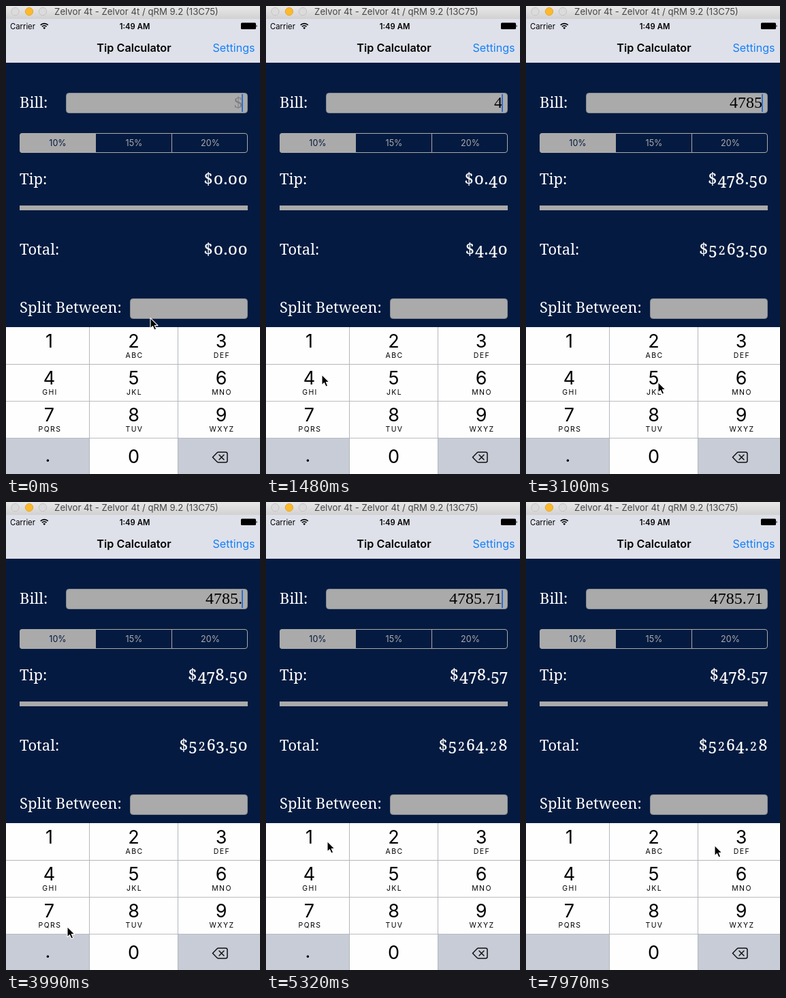
Animation of 373 by 685 pixels, one loop 8 s. Source, as an HTML page:

```html
<!DOCTYPE html>
<html lang="en">
<head>
<meta charset="utf-8">
<title>Tip Calculator</title>
<style>
  html, body { margin: 0; width: 100%; height: 100%; overflow: hidden; background: #041a40; }
  svg { display: block; width: 373px; height: 685px; font-family: Inter, Roboto, sans-serif; }
  text { white-space: pre; }
  .mid { text-anchor: middle; }
  .label { font: 22px "Noto Serif", Georgia, serif; fill: #fff; }
  .bill { font: 24px "Liberation Serif", Times, serif; text-anchor: end; }
  .money { text-anchor: middle; stroke: #fff; stroke-width: .2; }
  .digit { font-size: 27px; text-anchor: middle; }
  .letters { font-size: 10.5px; letter-spacing: 1.4px; text-anchor: middle; }
</style>
</head>
<body>
<svg viewBox="0 0 373 685">
  <defs>
    <linearGradient id="chrome" x2="0" y2="1">
      <stop stop-color="#e9e8e9"/><stop offset="1" stop-color="#d2d1d2"/>
    </linearGradient>
  </defs>

  <!-- window title -->
  <rect width="373" height="19" fill="url(#chrome)"/>
  <g stroke-width=".8">
    <circle cx="13.5" cy="8" r="5.7" fill="#dcdbdc" stroke="#bebdbe"/>
    <circle cx="34" cy="8" r="5.7" fill="#fdb92c" stroke="#dfa023"/>
    <circle cx="54" cy="8" r="5.7" fill="#dcdbdc" stroke="#bebdbe"/>
  </g>
  <text class="mid" x="191.5" y="13" font-size="13.2" fill="#454545">Zelvor 4t - Zelvor 4t / qRM 9.2 (13C75)</text>

  <!-- status and navigation bars -->
  <rect y="19" width="373" height="64" fill="#dfe1ea"/>
  <text x="6" y="33.5" font-size="11.3">Carrier</text>
  <g fill="none" stroke="#000" stroke-width="1.7">
    <path d="M50.7 27.9a7.7 7.7 0 0 1 11 0M52.9 30.2a4.7 4.7 0 0 1 6.6 0"/>
    <path d="M56.2 34l-1.9-2a2.7 2.7 0 0 1 3.8 0z" fill="#000" stroke="none"/>
  </g>
  <text class="mid" x="189" y="33.5" font-size="11.3" font-weight="600">1:49 AM</text>
  <rect x="345" y="24.5" width="22" height="9.5" rx="1.5"/>
  <path d="M367.6 27.4q2.2 1.8 0 3.6z"/>
  <text class="mid" x="188" y="67" font-size="16.2" font-weight="600">Tip Calculator</text>
  <text x="303.5" y="67" font-size="16.1" fill="#1580fb">Settings</text>

  <!-- calculator -->
  <rect y="83" width="373" height="388" fill="#041a40"/>
  <g class="label">
    <text x="20" y="149">Bill:</text>
    <text x="20" y="261">Tip:</text>
    <text x="20" y="363.5">Total:</text>
    <text x="20" y="449">Split Between:</text>
    <text class="money" id="tip"></text>
    <text class="money" id="total"></text>
  </g>
  <g fill="#aaa" stroke="#868a92">
    <rect x="88.5" y="127.5" width="266" height="29" rx="4"/>
    <rect x="182.5" y="428.5" width="172" height="29" rx="4"/>
  </g>
  <g fill="#aaa">
    <rect x="20" y="292" width="335" height="7"/>
    <path d="M24 186H132V215H24a4 4 0 0 1-4-4V190a4 4 0 0 1 4-4z"/>
    <g class="mid" font-size="12.6">
      <text x="76" y="205" fill="#041a40">10%</text>
      <text x="188" y="205">15%</text>
      <text x="300" y="205">20%</text>
    </g>
  </g>
  <g fill="none" stroke="#aaa">
    <rect x="20.5" y="186.5" width="334" height="28" rx="3.5"/>
    <path d="M131.5 186V215M243.5 186V215"/>
  </g>
  <text class="bill" id="bill" y="149"></text>
  <rect id="caret" x="346" y="129" width="2" height="26" fill="#2d6fd2"/>

  <!-- keypad -->
  <g id="keys"></g>
  <path d="M122.5 470V685M252.5 470V685M0 524.5H373M0 578.5H373M0 632.5H373"
        stroke="#b4b6bc" stroke-width=".9"/>
  <g id="caps"></g>
  <g fill="none" stroke="#111" stroke-width="1.5" stroke-linejoin="round" stroke-linecap="round">
    <path d="M303.5 660.5l6.3-6.5q1-1 2.3-1h10.4q2.5 0 2.5 2.5v10q0 2.5-2.5 2.5h-10.4q-1.3 0-2.3-1z"/>
    <path d="M313 657l7 7M320 657l-7 7"/>
  </g>

  <path id="pointer" d="M0 -1.4V13.8L3.5 10.6L6 16.2L8.7 15L6.3 9.6H11z"
        fill="#000" stroke="#fff" stroke-width="1.1" stroke-linejoin="round"/>
</svg>

<script>
const LOOP = 8000, STEP = 147.5;
const byId = id => document.getElementById(id);

function add(parent, name, attrs, text = "") {
  const el = document.createElementNS(parent.namespaceURI, name);
  for (const key in attrs) el.setAttribute(key, attrs[key]);
  el.textContent = text;
  parent.append(el);
  return el;
}

// Keypad
const colEdges = [0, 122.5, 252.5, 373], colMids = [63.5, 187.5, 316];
const letters = ["", "ABC", "DEF", "GHI", "JKL", "MNO", "PQRS", "TUV", "WXYZ"];
const WHITE = "#fefefe", GREY = "#c8ccd7";
const keys = {};
[..."123456789.0<"].forEach((key, i) => {
  const col = i % 3, row = Math.floor(i / 3), x = colMids[col];
  keys[key] = add(byId("keys"), "rect", {
    x: colEdges[col], y: 470 + row * 54 + (row ? .5 : 0),
    width: colEdges[col + 1] - colEdges[col], height: 54.5,
    fill: ".<".includes(key) ? GREY : WHITE
  });
  if (key === "<") return;
  const cap = { class: "digit", x: key === "." ? 61.5 : x, y: row < 3 ? 500 + row * 54 : 669 };
  if (key === ".") Object.assign(cap, { id: "point", y: 667 });
  add(byId("caps"), "text", cap, key);
  if (letters[i]) add(byId("caps"), "text", { class: "letters", x: x + 1, y: 515 + row * 54 }, letters[i]);
});

// Old-style figures: 0 1 2 at x-height, 3 4 5 7 9 hang below the baseline.
const advance = { 0: 14.7, 1: 10.3, 2: 13.4, 3: 13.2, 4: 13.6, 5: 12.7, 6: 13.6, 7: 12.1, 8: 14.3, 9: 13.6, $: 14.6, ".": 6.5 };
function showMoney(el, value, y) {
  const chars = [..."$" + value.toFixed(2)];
  let x = 355 - chars.reduce((sum, c) => sum + advance[c], 0);
  el.textContent = "";
  for (const c of chars) {
    const size = "0$".includes(c) ? 23.8 : "12".includes(c) ? 17.5 : 23;
    add(el, "tspan", {
      x: x + advance[c] / 2, y: y + ("34579".includes(c) ? 4.6 : 0), "font-size": size
    }, c === "0" ? "o" : c);
    x += advance[c];
  }
}

const typed = [[0, ""], [10, "4"], [14, "47"], [18, "478"], [21, "4785"], [25, "4785."], [29, "4785.7"], [34, "4785.71"]];
const pressed = { 9: "4", 13: "7", 17: "8", 20: "5", 33: "1" };
const caretOff = [[3, 5], [31, 32], [39, 42], [46, 99]];
const path = [
  [0, 212, 458], [1, 212, 458], [8, 82, 539], [10, 82, 541], [13, 86, 596], [14, 88, 597],
  [17, 192, 579], [18, 193, 579], [20, 196, 551], [21, 194, 552], [24, 89, 667], [25, 89, 667],
  [27, 90, 623], [29, 90, 621], [33, 90, 499], [36, 90, 498], [40, 211, 444], [45, 233, 427],
  [46, 234, 436], [48, 234, 436], [54, 277, 504]
];

function pointerAt(k) {
  const i = path.findIndex(p => p[0] >= k);
  if (i <= 0) return path[0].slice(1);
  const [k0, x0, y0] = path[i - 1], [k1, x1, y1] = path[i];
  const u = (k - k0) / (k1 - k0), e = u * u * (3 - 2 * u);
  return [x0 + (x1 - x0) * e, y0 + (y1 - y0) * e];
}

let shown = -1;
function draw(k) {
  const text = typed.filter(entry => entry[0] <= k).pop()[1];
  const focused = k < 46;
  const bill = byId("bill");
  bill.textContent = text || "$";
  bill.setAttribute("fill", text ? "#000" : "#7c7c7c");
  bill.setAttribute("x", focused ? 347 : 347.7);
  showMoney(byId("tip"), Number(text) * .1, 261.3);
  showMoney(byId("total"), Number(text) * 1.1, 363.8);
  for (const d of "45718") keys[d].setAttribute("fill", pressed[k] === d ? GREY : WHITE);
  const hidden = caretOff.some(([from, to]) => k >= from && k <= to);
  byId("caret").setAttribute("visibility", hidden ? "hidden" : "visible");
  byId("point").setAttribute("visibility", k < 49 ? "visible" : "hidden");
  byId("pointer").setAttribute("transform", `translate(${pointerAt(k)})`);
}

const start = performance.now();
function tick() {
  const time = Math.max(0, performance.now() - start) % LOOP;
  const k = Math.min(54, Math.floor(time / STEP));
  if (k !== shown) draw(shown = k);
  requestAnimationFrame(tick);
}
tick();
</script>
</body>
</html>
```
